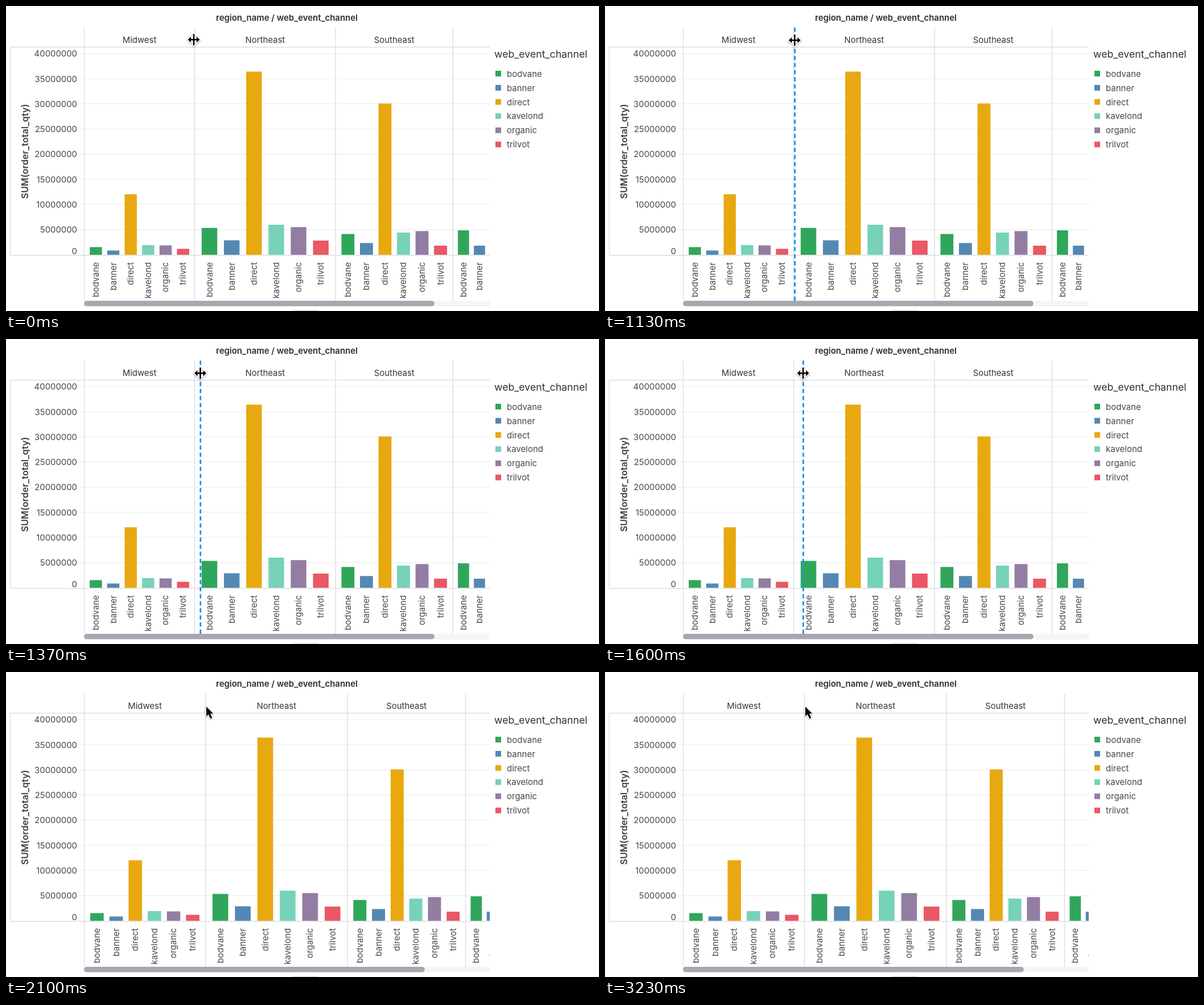
These frames come from a looping animation (1042 by 537 pixels, 3260 ms). An HTML page with a canvas:

```html
<!DOCTYPE html>
<html lang="en">
<head>
<meta charset="utf-8">
<title>Resizing a chart panel</title>
<style>
html, body { margin: 0; width: 100%; height: 100%; overflow: hidden; background: #fff; }
canvas { display: block; width: 1042px; height: 537px; }
</style>
</head>
<body>
<canvas id="stage"></canvas>
<script>
const W = 1042, H = 537, LOOP = 3260;
const LEFT = 137.5, RIGHT = 850, TOP = 72.5, BASE = 438, BOTTOM = 519;
const LINE_ON = 1030, ARROW_ON = 2050, DROP = 2100;
const SANS = 'Inter, "Open Sans", sans-serif';

const channels = ['bodvane', 'banner', 'direct', 'kavelond', 'organic', 'trilvot'];
const colors = ['#30a65b', '#5488b2', '#e8a810', '#76d2b8', '#937da3', '#ea5765'];
const regions = [
  { name: 'Midwest', bars: [13.5, 7.5, 106.5, 17, 16.5, 10.5] },
  { name: 'Northeast', bars: [47.3, 25.5, 322.5, 53, 48.7, 25] },
  { name: 'Southeast', bars: [36.6, 20.7, 266.4, 39.1, 41.7, 16] },
  { name: '', bars: [43, 16] }
];
const edgesBefore = [LEFT, 331.5, 579.2, 785.2, 963];
const edgesAfter = [LEFT, 350.5, 600, 807.5, 986.5];

// [time, x] of the dragged divider
const drag = [[LINE_ON, 331.5], [1130, 333.5], [1370, 341.7], [1640, 349.5], [1800, 351.5]];

const canvas = document.getElementById('stage');
const ctx = canvas.getContext('2d');
const dpr = window.devicePixelRatio || 1;
canvas.width = W * dpr;
canvas.height = H * dpr;

function dragX(t) {
  if (t <= drag[0][0]) return drag[0][1];
  for (let i = 1; i < drag.length; i++) {
    const [t0, x0] = drag[i - 1], [t1, x1] = drag[i];
    if (t < t1) return x0 + (x1 - x0) * (t - t0) / (t1 - t0);
  }
  return drag[drag.length - 1][1];
}

function line(x0, y0, x1, y1, color, width = 1) {
  ctx.strokeStyle = color;
  ctx.lineWidth = width;
  ctx.beginPath();
  ctx.moveTo(x0, y0);
  ctx.lineTo(x1, y1);
  ctx.stroke();
}

function text(str, x, y, size, { weight = 400, color = '#48484d', align = 'left', turn = false } = {}) {
  ctx.save();
  ctx.translate(x, y);
  if (turn) ctx.rotate(-Math.PI / 2);
  ctx.font = `${weight} ${size}px ${SANS}`;
  ctx.textAlign = align;
  ctx.fillStyle = color;
  ctx.fillText(str, 0, 0);
  ctx.restore();
}

function pill(x, y, w, h, color) {
  ctx.fillStyle = color;
  ctx.beginPath();
  ctx.roundRect(x, y, w, h, h / 2);
  ctx.fill();
}

function drawAxis() {
  for (let i = 0; i <= 8; i++) {
    const y = BASE - i * 44.3;
    if (i) line(129, y, RIGHT, y, '#efeff1', 1.4);
    const label = i ? String(i * 5000000) : '0';
    text(label, 125, (i ? y : 431) + 5.6, 14.9, { align: 'right' });
  }
  line(129, BASE + .5, LEFT, BASE + .5, '#e8e8eb');
  text('SUM(order_total_qty)', 39, 256, 16.2, { weight: 600, color: '#3f3f44', align: 'center', turn: true });
}

function drawPanel(region, x0, x1) {
  const step = (x1 - x0) / 6.33, barW = step * .7;
  text(region.name, (x0 + x1) / 2, 65.4, 14.9, { color: '#35353a', align: 'center' });
  region.bars.forEach((h, i) => {
    const cx = x0 + step * (.665 + i);
    ctx.fillStyle = colors[i];
    ctx.fillRect(cx - barW / 2, BASE - h, barW, h);
    line(cx, BASE + 1, cx, BASE + 8, '#ececef');
    text(channels[i], cx + 5, 451, 15, { align: 'right', turn: true });
  });
}

function drawPanels(edges) {
  ctx.save();
  ctx.beginPath();
  ctx.rect(LEFT - 1, 30, RIGHT - LEFT + 1, BOTTOM - 30);
  ctx.clip();
  regions.forEach((r, i) => drawPanel(r, edges[i], edges[i + 1]));
  edges.slice(0, 4).forEach(x => line(x, 38, x, BOTTOM, '#dcdee3', 1.4));
  ctx.restore();
}

function drawFrame() {
  const color = '#dcdee3';
  line(7.5, TOP, RIGHT, TOP, color, 1.3);
  line(7.5, BASE + 1, RIGHT, BASE + 1, color, 1.3);
  line(7.5, TOP, 7.5, BASE + 1, color, 1.3);
}

function drawLegend() {
  text('web_event_channel', 858, 91, 17.7, { color: '#303035' });
  channels.forEach((name, i) => {
    const y = 119 + i * 24.95;
    ctx.fillStyle = colors[i];
    ctx.fillRect(860, y - 5, 10, 10);
    text(name, 880, y + 5.6, 15);
  });
}

function drawScrollbar(edges) {
  const view = RIGHT - 137, total = edges[4] - LEFT;
  ctx.fillStyle = '#f5f5f6';
  ctx.fillRect(137, 519, view, 10);
  pill(137, 519, view * view / total, 9.6, '#a8a7b1');
  line(504, 536, 549, 536, '#cbcbd0', 1.2);
}

function drawDivider(x) {
  ctx.save();
  ctx.setLineDash([7.5, 4.96]);
  line(x, 38, x, BOTTOM, '#1f8fee', 2.8);
  ctx.restore();
}

// Black pointer shape with a white rim and a soft shadow
function drawCursor(x, y, points, rim) {
  ctx.save();
  ctx.translate(x, y);
  ctx.beginPath();
  points.forEach(([px, py]) => ctx.lineTo(px, py));
  ctx.closePath();
  ctx.lineJoin = 'round';
  ctx.lineWidth = rim;
  ctx.strokeStyle = '#fff';
  ctx.shadowColor = 'rgba(0,0,0,.35)';
  ctx.shadowBlur = 3 * dpr;
  ctx.shadowOffsetY = dpr;
  ctx.stroke();
  ctx.shadowColor = 'transparent';
  ctx.fillStyle = '#000';
  ctx.fill();
  ctx.restore();
}

const quarter = [[1.3, -10], [1.3, -1.3], [5, -1.3], [5, -5.2], [10.5, 0]];
const right = quarter.concat(quarter.slice(0, 4).reverse().map(([x, y]) => [x, -y]));
const resizeShape = right.concat(right.map(([x, y]) => [-x, -y]));
const arrowShape = [[0, 0], [0, 17], [3.8, 13.4], [7.2, 21], [10.3, 19.7], [7.1, 12.2], [12.2, 12.2]];

function draw(t) {
  const edges = t < DROP ? edgesBefore : edgesAfter;
  ctx.setTransform(dpr, 0, 0, dpr, 0, 0);
  ctx.fillStyle = '#fff';
  ctx.fillRect(0, 0, W, H);
  text('region_name / web_event_channel', 493.5, 26, 14.95, { weight: 600, color: '#2b2b30', align: 'center' });
  drawAxis();
  drawPanels(edges);
  drawFrame();
  drawLegend();
  drawScrollbar(edges);

  const dragging = t >= LINE_ON && t < DROP;
  const x = dragX(t);
  if (dragging) drawDivider(x);
  if (t >= ARROW_ON) drawCursor(352, 61, arrowShape, 2.2);
  else drawCursor(dragging ? x - .3 : 330, t < 300 ? 59.2 : 60.2, resizeShape, 3.4);
}

function tick(now) {
  draw(now % LOOP);
  requestAnimationFrame(tick);
}
draw(0);
requestAnimationFrame(tick);
</script>
</body>
</html>
```
